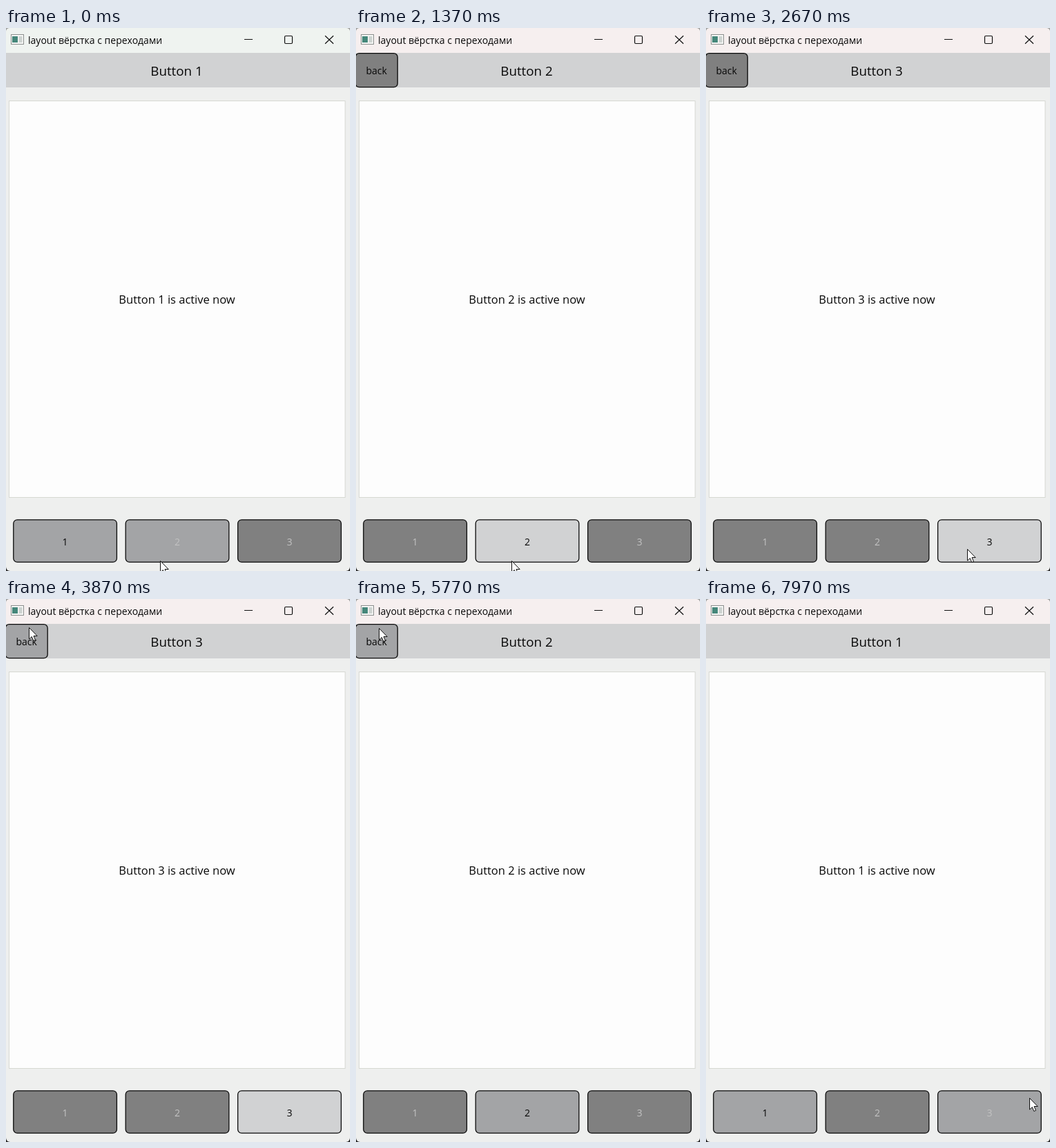
An HTML page for the animation above (8 s loop, 498 by 786 pixels).

```html
<!DOCTYPE html>
<html lang="ru">
<head>
<meta charset="utf-8">
<title>layout</title>
<style>
  html, body { margin: 0; width: 100%; height: 100%; overflow: hidden; }
  body { background: linear-gradient(#a2a3a2 50%, #2a2a2a 50%); }
  svg { display: block; width: 498px; height: 786px; }
  text { font: 14px "Open Sans", "Noto Sans", sans-serif; fill: #080808; }
  .middle { text-anchor: middle; }
  .button rect { stroke: #0a0a0a; stroke-width: 1.3; }
</style>
</head>
<body>
<svg viewBox="0 0 498 786">
  <rect width="498" height="786" rx="6" fill="#eeefee"/>

  <path id="titlebar" d="M0 36V6Q0 0 6 0H492Q498 0 498 6V36Z"/>
  <rect x="7.5" y="9.5" width="18" height="14" fill="#f6f7f6" stroke="#8c908e"/>
  <rect x="9" y="12" width="8" height="9" fill="#45877a"/>
  <rect x="18.5" y="12" width="5" height="9" fill="#cdd3d0"/>
  <text x="32" y="23">layout вёрстка с переходами</text>
  <g fill="none" stroke="#111" stroke-width="1.2">
    <path d="M345 16.5H357M462 11.2L474 22.8M474 11.2L462 22.8"/>
    <rect x="403.5" y="11.5" width="11" height="11" rx="1.5"/>
  </g>

  <rect y="36" width="498" height="50" fill="#d1d2d3"/>
  <text id="heading" class="middle" x="247" y="69" style="font-size:18.75px"></text>

  <rect x="4.5" y="105.5" width="486.5" height="574" fill="#fdfdfd" stroke="#d6d8d2"/>
  <text id="message" class="middle" x="247.5" y="399" style="font-size:16.5px"></text>

  <g id="buttons"></g>
  <path id="cursor" d="M0 0V16.5L3.8 13L6.3 19L9 17.8L6.5 12H11.7Z" fill="#fff" stroke="#111"/>
</svg>

<script>
const DURATION = 8000;
const FILL = { idle: '#808080', hover: '#a3a4a6', pressed: '#c0c0c0', checked: '#d1d2d3' };
const INK = { active: '#080808', idle: '#c2c2c2' };
const TITLEBAR = { blurred: '#eff3f0', focused: '#f6efef' };

// Start time, active page, look of the active page's button
const states = [
  [0, 1, 'hover'],
  [450, 2, 'pressed'],
  [680, 2, 'checked'],
  [1980, 3, 'pressed'],
  [2160, 3, 'checked'],
  [4600, 2, 'hover'],
  [6800, 1, 'hover'],
];

// Time, x and y of the pointer tip
const pointerKeys = [
  [0, 223, 771], [1200, 223, 771], [1370, 225, 771], [1680, 378, 754],
  [3000, 378, 754], [3700, 33, 41], [4500, 33, 41], [4600, 33, 42],
  [6880, 33, 42], [7500, 462, 725], [7900, 468, 722], [DURATION, 468, 722],
];

const $ = id => document.getElementById(id);

function makeButton(label, x, y, width, height, baseline) {
  const group = document.createElementNS('http://www.w3.org/2000/svg', 'g');
  group.setAttribute('class', 'button');
  group.innerHTML =
    `<rect x="${x}" y="${y}" width="${width}" height="${height}" rx="5.5"/>
     <text class="middle" x="${x + width / 2}" y="${baseline}">${label}</text>`;
  $('buttons').append(group);
  const [rect, text] = group.children;
  return {
    group,
    contains: (px, py) => px >= x && px <= x + width && py >= y && py <= y + height,
    paint(fill, ink) {
      rect.style.fill = fill;
      text.style.fill = ink;
    },
  };
}

const back = makeButton('back', -0.8, 36.7, 61, 49, 67);
const tabs = [1, 2, 3].map(n => makeButton(n, 10.8 + (n - 1) * 162.4, 711.8, 149.6, 61.4, 748.5));

function pointerAt(time) {
  const i = pointerKeys.findIndex(key => key[0] > time);
  const [t0, x0, y0] = pointerKeys[i - 1];
  const [t1, x1, y1] = pointerKeys[i];
  const u = (time - t0) / (t1 - t0);
  const ease = u * u * (3 - 2 * u);
  return [x0 + (x1 - x0) * ease, y0 + (y1 - y0) * ease].map(Math.round);
}

function render(time) {
  const step = states.findLastIndex(state => state[0] <= time);
  const [, page, look] = states[step];
  const [x, y] = pointerAt(time);
  const restFill = button => button.contains(x, y) ? FILL.hover : FILL.idle;

  // The first click also gives the window focus
  $('titlebar').style.fill = step > 0 ? TITLEBAR.focused : TITLEBAR.blurred;
  $('heading').textContent = `Button ${page}`;
  $('message').textContent = `Button ${page} is active now`;
  $('cursor').setAttribute('transform', `translate(${x + 0.5} ${y + 0.5})`);

  back.group.style.display = page === 1 ? 'none' : '';
  back.paint(restFill(back), INK.active);
  tabs.forEach((tab, i) => {
    const active = i + 1 === page;
    tab.paint(active ? FILL[look] : restFill(tab), active ? INK.active : INK.idle);
  });
}

const start = performance.now();
function tick() {
  render((performance.now() - start) % DURATION);
  requestAnimationFrame(tick);
}
tick();
</script>
</body>
</html>
```
